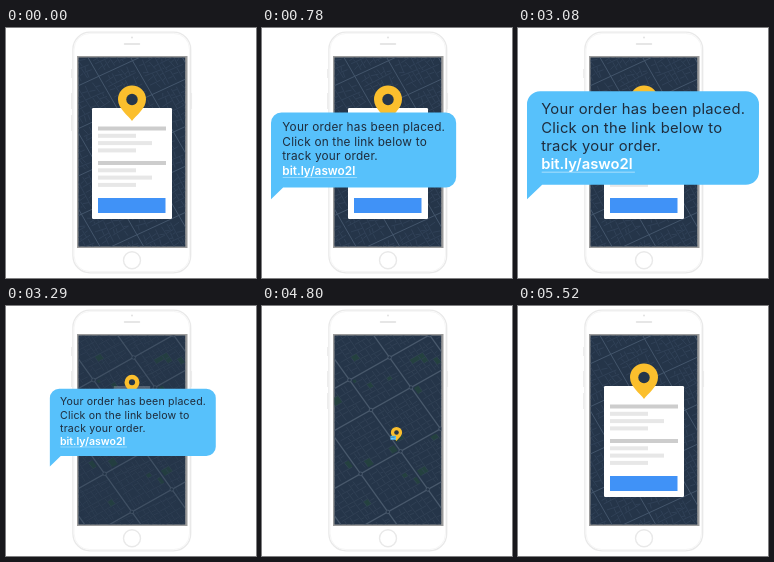
An HTML page that plays this animation: 250x250 px, repeating every 7.52 s.

```html
<!DOCTYPE html>
<html lang="en">
<head>
<meta charset="utf-8">
<title>Order tracking</title>
<style>
  html, body { margin: 0; width: 100%; height: 100%; overflow: hidden; background: #fff; }
  svg { display: block; width: 100vw; height: 100vh; }
  text { font: 400 14.6px Inter, "Open Sans", sans-serif; letter-spacing: 0.25px; fill: #1f2c3c; }
  .link { font-weight: 600; letter-spacing: 0; fill: #fff; }
</style>
</head>
<body>
<svg viewBox="0 0 250 250">
  <defs>
    <clipPath id="screen"><rect x="72.5" y="29.5" width="106.7" height="189"/></clipPath>
  </defs>

  <g fill="none" stroke="#e9e9e9">
    <path d="M65.5 41v9M65.5 65v16M65.5 87v16M185.6 65v16" stroke-width="0.8"/>
    <rect x="66.9" y="4.2" width="117.8" height="240.6" rx="17" fill="#fff" stroke-width="1.3"/>
    <rect x="68.1" y="5.4" width="115.4" height="238.2" rx="15.8" stroke="#f6f6f6" stroke-width="1"/>
    <circle cx="126" cy="232.3" r="8.5" stroke-width="1.4"/>
    <path d="M118.5 16h15" stroke="#dedede" stroke-width="1.5" stroke-linecap="round"/>
    <circle cx="126" cy="9.5" r="1" fill="#e2e2e2" stroke="none"/>
  </g>
  <rect x="71" y="28" width="110.5" height="192" fill="#9b9b9b"/>

  <g clip-path="url(#screen)">
    <rect x="72" y="29" width="109" height="191" fill="#253549"/>
    <g id="far"></g>
    <g id="near"></g>
  </g>

  <g id="card">
    <rect x="86" y="80" width="80" height="111" rx="1.2" fill="#fff"/>
    <g id="rows"></g>
    <rect x="92" y="170" width="67.5" height="15" fill="#4092f7"/>
  </g>
  <g id="pin">
    <path d="M0 21.5C-4 16 -14 9 -14 0A14 14 0 0 1 14 0C14 9 4 16 0 21.5Z" fill="#fbbf2d"/>
    <circle r="5.7" fill="#25364a"/>
  </g>
  <g id="bubble">
    <path d="M0 0V-94.5A13 13 0 0 1 13 -107.5H216A13 13 0 0 1 229 -94.5V-27.5A13 13 0 0 1 216 -14.5H15Z" fill="#57c1fb"/>
    <text x="14" y="-84.5">Your order has been placed.</text>
    <text x="14" y="-66.3">Click on the link below to</text>
    <text x="14" y="-48.2">track your order.</text>
    <text x="14" y="-30.2" class="link">bit.ly/aswo2l</text>
    <path d="M14.5 -27H106.5" stroke="#fff" stroke-width="0.7" opacity="0.7"/>
  </g>
</svg>
<script>
const LOOP = 7520, STEP = 30;
const $ = id => document.getElementById(id);
const clamp = x => Math.max(0, Math.min(1, x));
const mix = (a, b, p) => a + (b - a) * p;
const smooth = p => p * p * (3 - 2 * p);

function seeded(seed) {
  return () => (seed = (seed * 16807) % 2147483647) / 2147483647;
}

// Street grid on a skewed basis: u and v are unit directions from (ox, oy).
function drawMap(node, o) {
  const rnd = seeded(o.seed);
  const spot = (a, b) => [o.ox + a * o.u[0] + b * o.v[0], o.oy + a * o.u[1] + b * o.v[1]]
    .map(n => n.toFixed(1));
  const at = (a, b) => spot(a, b).join(" ");
  const line = (a, b, c, d) => `M${at(a, b)}L${at(c, d)}`;
  let minor = "", major = "", parks = "", rings = "";

  function split(a, b, c, d, depth) {
    const w = c - a, h = d - b;
    if (depth === 0 || Math.max(w, h) < o.min) {
      if (rnd() < o.green) parks += `M${at(a, b)}L${at(c, b)}L${at(c, d)}L${at(a, d)}Z`;
      return;
    }
    const k = mix(0.3, 0.7, rnd());
    if (w > h) {
      const m = a + w * k;
      minor += line(m, b + 1, m + (rnd() - 0.5) * o.bend, d - 1);
      split(a, b, m, d, depth - 1);
      split(m, b, c, d, depth - 1);
    } else {
      const m = b + h * k;
      minor += line(a + 1, m, c - 1, m + (rnd() - 0.5) * o.bend);
      split(a, b, c, m, depth - 1);
      split(a, m, c, d, depth - 1);
    }
  }

  o.us.forEach((a, i) => {
    major += line(a, -200, a, 200);
    o.vs.forEach((b, j) => {
      if (!i) major += line(-200, b, 200, b);
      if (o.ring) {
        const [x, y] = spot(a, b);
        rings += `<circle cx="${x}" cy="${y}" r="${o.ring}"/>`;
      }
      if (i + 1 < o.us.length && j + 1 < o.vs.length)
        split(a + 2, b + 2, o.us[i + 1] - 2, o.vs[j + 1] - 2, 7);
    });
  });
  node.innerHTML = `<path d="${parks}" fill="#24413f"/>
    <path d="${minor}" fill="none" stroke="${o.thin}" stroke-width="${o.thinW}"/>
    <path d="${major}" fill="none" stroke="${o.thick}" stroke-width="${o.thickW}"/>
    <g fill="#253549" stroke="${o.thick}" stroke-width="1">${rings}</g>`;
}

drawMap($("far"), {
  seed: 71, ox: 126, oy: 110, u: [0.5, 0.87], v: [0.91, -0.42],
  us: [-150, -108, -70, -31, 12, 48, 90, 130], vs: [-125, -82, -44, 2, 39, 84, 125],
  min: 9, bend: 4, green: 0, thin: "#35475d", thinW: 0.7, thick: "#43556b", thickW: 1, ring: 0
});
drawMap($("near"), {
  seed: 29, ox: 109, oy: 104, u: [0.58, 0.81], v: [0.87, -0.49],
  us: [-145, -91, -37, 0, 51, 98, 150], vs: [-140, -92, -46, 0, 46, 92, 138],
  min: 9, bend: 1.5, green: 0.04, thin: "#364659", thinW: 0.7, thick: "#48586b", thickW: 1.3, ring: 1.8
});

const widths = [68, 38, 54, 38];
$("rows").innerHTML = [98.5, 133].map(top => widths.map((w, i) =>
  `<rect x="92" y="${top + i * 7.3}" width="${w}" height="4" fill="${i ? "#e7e7e7" : "#cdcdcd"}"/>`
).join("")).join("");

function place(id, x, y, sx, sy = sx, opacity = 1) {
  const node = $(id);
  node.setAttribute("transform", `translate(${x} ${y}) scale(${sx} ${sy})`);
  node.setAttribute("opacity", opacity);
}

// open: card shown (1) or folded into the pin (0); drop: pin travel down the map.
function setScene(open, drop) {
  const s = mix(0.3, 1, open);
  place("card", 126 * (1 - s), 80 * (1 - s), s, s, open);
  place("pin", mix(126, 134.5, drop), mix(mix(77.5, 71.5, open), 126.5, drop), mix(0.4, 1, open));
  $("far").setAttribute("opacity", open);
  $("near").setAttribute("opacity", 1 - open);
}

function setBubble(t) {
  if (t < 1080) {
    const p = t / 1080, s = p * (1.43 - 0.43 * p);
    place("bubble", 9, 171.3, s, s, clamp(p * 1.95));
  } else if (t < 3080) {
    place("bubble", 9, 171.3, 1);
  } else if (t < 5520) {
    const p = clamp((t - 3080) / 720);
    place("bubble", mix(9, 128.5, p), mix(171.3, 134.5, p),
      mix(1.013, 0.024, p), mix(1.005, 0.045, p), 1 - clamp((t - 4800) / 300));
  } else {
    place("bubble", 9, 171.3, 0);
  }
}

// Motion advances in fixed steps counted from the start of each phase.
function quantize(t) {
  const start = t < 3080 ? 0 : t < 4800 ? 3080 : 4800;
  return start + Math.floor((t - start) / STEP + 1e-6) * STEP;
}

function render(ms) {
  const t = quantize(ms % LOOP);
  if (t < 4800) {
    setScene(1 - clamp((t - 3080) / 270), smooth(clamp((t - 3350) / 450)));
  } else {
    setScene(clamp((t - 5250) / 270), 1 - smooth(clamp((t - 4800) / 450)));
  }
  setBubble(t);
}

const began = performance.now();
function tick() {
  render(performance.now() - began);
  requestAnimationFrame(tick);
}
render(0);
requestAnimationFrame(tick);
</script>
</body>
</html>
```
